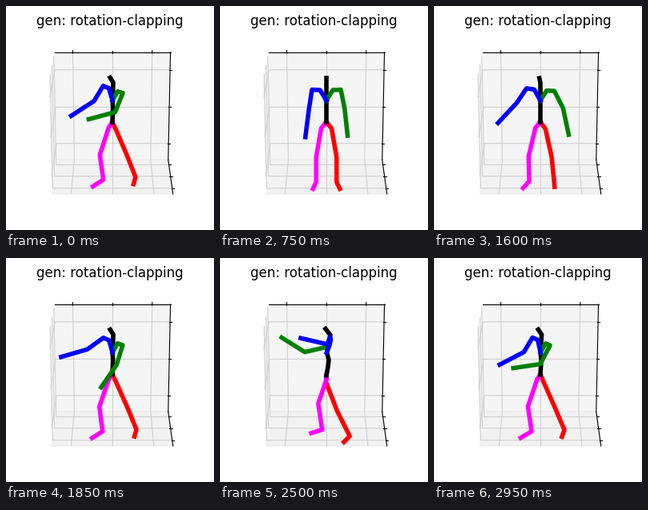
A matplotlib script for the animation above (3 s loop, 260 by 280 pixels).

```python
import numpy as np
import matplotlib.pyplot as plt
from matplotlib.animation import FuncAnimation

W, H, DPI = 260, 280, 100
FRAMES, STEP = 60, 50
LOOP = FRAMES * STEP
ORIGIN = np.array([133, 145])
TILT = np.radians(20)
FOREARM, HAND = 24, 1.42

# Pose channels over the loop; angles in degrees, clockwise from screen right.
TIMES = [0, 400, 1200, 1600, 1800, 2100, 2500]
CHANNELS = dict(
    turn=[47, 0, 0, 15, 40, 85, 94],
    spread=[0.2, 1, 0.1, 0.9, 0.5, 0.3, 0.3],
    right_upper=[121, 101, 98, 124, 141, 156, 111],
    right_fore=[147, 100, 96, 133, 157, 193, 193],
    right_reach=[22, 26, 25, 22, 25, 19, 10],
    left_upper=[112, 76, 82, 63, 95, 170, 167],
    left_fore=[165, 83, 85, 78, 110, 208, 212],
)


def looped_curve(times, values):
    """Return a looping monotone cubic through the key values."""
    t = np.r_[times, times[0] + LOOP].astype(float)
    p = np.r_[values, values[0]].astype(float)
    h = np.diff(t)
    d = np.diff(p) / h
    before, h0 = np.roll(d, 1), np.roll(h, 1)
    same = before * d > 0
    a, b = np.where(same, before, 1), np.where(same, d, 1)
    w0, w1 = 2 * h + h0, h + 2 * h0
    m = np.where(same, (w0 + w1) / (w0 / a + w1 / b), 0)
    m = np.r_[m, m[0]]

    def at(now):
        i = np.searchsorted(t, now, side="right") - 1
        s = (now - t[i]) / h[i]
        return ((1 + 2 * s) * (1 - s) ** 2 * p[i] + s * s * (3 - 2 * s) * p[i + 1]
                + s * (1 - s) * h[i] * ((1 - s) * m[i] - s * m[i + 1]))

    return at


curves = {name: looped_curve(TIMES, keys) for name, keys in CHANNELS.items()}


def project(points, turn):
    """Turn body points (side, up, forward) and place them on the stage."""
    x, y, z = np.array(points, float).T
    across = x * np.cos(turn) - z * np.sin(turn)
    depth = z * np.cos(turn) + x * np.sin(turn)
    return ORIGIN + np.c_[across, depth * np.sin(TILT) - y * np.cos(TILT)]


def leg(side, spread, stride, swing):
    """Hip, knee, ankle and foot; swing is how far each joint strides."""
    knee, ankle, foot = (rest + (far - rest) * stride
                         for rest, far in zip((3, -3, 12), swing))
    return [(side * 6.5, -8.5, 0),
            (side * (10.5 + 3.5 * spread), -45.5 + 1.5 * stride, knee),
            (side * (9 + 6 * spread), -81 + 3 * stride, ankle),
            (side * (13 + 6 * spread), -84.5, foot)]


def polar(angle, length):
    return length * np.array([np.cos(np.radians(angle)), np.sin(np.radians(angle))])


def arm(shoulder, upper, reach, fore):
    elbow = shoulder + polar(upper, reach)
    return [elbow, elbow + polar(fore, FOREARM), elbow + polar(fore, FOREARM * HAND)]


def pose(now):
    p = {name: float(curve(now)) for name, curve in curves.items()}
    turn = np.radians(p["turn"])
    stride = np.clip(p["turn"] / 45, 0, 1)
    arch = np.sin(turn) ** 4

    pelvis, chest = (0, -2 * arch, 0), (0, 28.7, -0.5 * arch)
    spine = [pelvis, (0, 10, -2 * arch), (0, 19, -3 * arch), chest,
             (0, 52, -5 * arch), (0, 60, 5 - 4 * arch)]
    left_leg = leg(1, p["spread"], stride, (-14, -30, -23))
    right_leg = leg(-1, p["spread"], stride, (11, 6, 20))
    lines = {"red": project([pelvis] + left_leg, turn),
             "magenta": project([pelvis] + right_leg, turn),
             "black": project(spine, turn)}

    arms = [("green", 1, p["left_upper"], 24 + 6 * arch, p["left_fore"]),
            ("blue", -1, p["right_upper"], p["right_reach"], p["right_fore"])]
    for color, side, upper, reach, fore in arms:
        base = project([chest, (side * 8, 42.5, -5 * arch),
                        (side * 18, 43, -3.5 * arch)], turn)
        lines[color] = np.vstack([base, arm(base[-1], upper, reach, fore)])
    return lines


plt.rcParams["grid.color"] = "#d0d0d0"
fig = plt.figure(figsize=(W / DPI, H / DPI), dpi=DPI, facecolor="white")

# Empty 3D room seen from the front and slightly above.
SIDE = 230
room = fig.add_axes([15 / W, 17.3 / H, SIDE / W, SIDE / H], projection="3d")
room.view_init(elev=110, azim=-90)
for axis in "xyz":
    room.set(**{f"{axis}lim": (-0.73, 0.73), f"{axis}ticks": (-0.5, 0, 0.5),
                f"{axis}ticklabels": []})

stage = fig.add_axes([0, 0, 1, 1])
stage.set(xlim=(0, W), ylim=(H, 0))
stage.axis("off")
stage.text(W / 2, 23.8, "gen: rotation-clapping", fontsize=12, ha="center")

limbs = {color: stage.plot([], [], color=color, lw=4)[0]
         for color in ("red", "magenta", "black", "green", "blue")}


def draw(frame):
    for color, points in pose(frame * STEP).items():
        limbs[color].set_data(*points.T)
    return list(limbs.values())


anim = FuncAnimation(fig, draw, frames=FRAMES, interval=STEP, repeat=True, repeat_delay=0)
plt.show()
```
